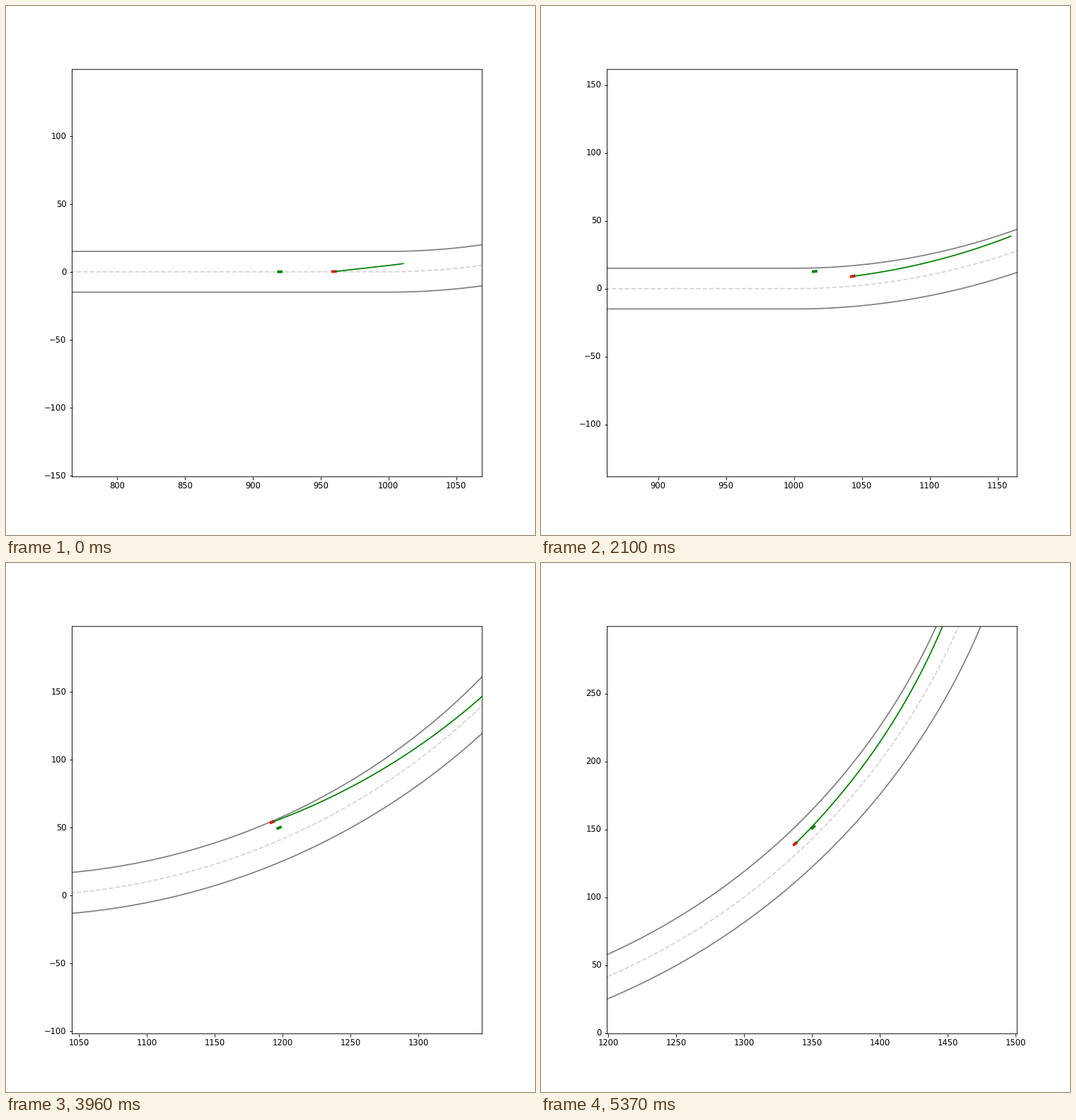
A matplotlib script for the animation above (5400 ms loop, 748 by 748 pixels).

```python
import numpy as np
import matplotlib.pyplot as plt
from matplotlib.animation import FuncAnimation
from matplotlib.patches import Rectangle

plt.rcParams.update({"path.snap": False, "text.hinting": "none"})

FRAMES, INTERVAL = 180, 30
BEND, R, HALF_ROAD = 1000, 500, 15      # bend start, radius, half road width
CAR = np.array([4, 2])
HALF_VIEW = np.array([150 * 0.775 / 0.77, 150])
T = np.arange(FRAMES)


def smooth(keys, values):
    """Smooth curve over all frames through a few key points."""
    keys, values = np.array(keys), np.array(values)
    slopes = np.gradient(values, keys)
    slopes[0] = 0
    k = np.clip(np.searchsorted(keys, T, side="right") - 1, 0, len(keys) - 2)
    dt = keys[k + 1] - keys[k]
    u = (T - keys[k]) / dt
    return (values[k] * (1 + 2 * u) * (1 - u) ** 2
            + values[k + 1] * u * u * (3 - 2 * u)
            + slopes[k] * dt * u * (1 - u) ** 2
            - slopes[k + 1] * dt * u * u * (1 - u))


def road_point(s, d):
    """Distance along the road and offset to the left, as x and y."""
    phi = np.maximum(s - BEND, 0) / R
    return np.array([np.minimum(s, BEND) + (R - d) * np.sin(phi),
                     R - (R - d) * np.cos(phi)])


def drive(start, speed, offset):
    """Distance along the road, rear right corner and heading per frame."""
    forward = np.sqrt(speed ** 2 - np.gradient(offset) ** 2)
    s = np.empty(FRAMES)
    s[0] = start
    for i in T[1:]:
        step = (forward[i - 1] + forward[i]) / 2
        s[i] = s[i - 1] + step * (R / (R - offset[i]) if s[i - 1] > BEND else 1)
    pos = road_point(s, offset)
    dx, dy = np.gradient(pos, axis=1)
    return s, pos.T - CAR / 2, np.arctan2(dy, dx)


def place(car, corner, heading):
    car.set_xy(corner)
    car.set_angle(np.degrees(heading))


lead_speed = 0.5 + 0.02 * T
lead_offset = 14.4 * np.exp(-((T - 118.5) / 39.5) ** 2 / 2)
lead_s, lead_corner, lead_heading = drive(960, lead_speed, lead_offset)

chase_offset = smooth([0, 30, 54, 76, 95, 114, 149, 179],
                      [0, 2.5, 7.9, 13.1, 12.1, 8, 7.8, 3.8])
_, chase_corner, chase_heading = drive(
    920, np.minimum(0.5 + 0.025 * T, 3.95), chase_offset)

# the lead car plans fifty steps ahead towards an offset on the road
reach = np.minimum(50 * lead_speed + 26, 198) * R / (R - lead_offset)
aim = smooth([0, 30, 54, 86, 114, 149, 179],
             [5.9, 8.6, 10.6, 11.5, 5.2, 5.8, 10.9])

fig, ax = plt.subplots(figsize=(9, 9), dpi=748 / 9)
for axis in (ax.xaxis, ax.yaxis):
    axis.set_major_locator(plt.MultipleLocator(50))

s_road = np.append(0, np.linspace(BEND, BEND + R * np.pi / 2, 200))
for offset in (HALF_ROAD, -HALF_ROAD):
    ax.plot(*road_point(s_road, offset), color="gray", zorder=1)
ax.plot(*road_point(s_road, 0), "--", color="lightgray", zorder=1)

lead, chase = (ax.add_patch(Rectangle((0, 0), *CAR, facecolor=c, zorder=2))
               for c in ("red", "green"))
plan, = ax.plot([], [], color="green", zorder=3)


def update(i):
    place(lead, lead_corner[i], lead_heading[i])
    place(chase, chase_corner[i], chase_heading[i])

    # the plan starts just ahead of the middle of the turned car
    a = lead_heading[i]
    turn = np.array([[np.cos(a), -np.sin(a)], [np.sin(a), np.cos(a)]])
    x, y = lead_corner[i] + turn @ (CAR * [0.7, 0.5])
    bent = x > BEND
    s0 = BEND + R * np.arctan2(x - BEND, R - y) if bent else x
    d0 = R - np.hypot(x - BEND, R - y) if bent else y
    plan.set_data(*road_point(np.linspace(s0, lead_s[i] + reach[i], 51),
                              np.linspace(d0, aim[i], 51)))

    low, high = chase_corner[i] - HALF_VIEW, chase_corner[i] + HALF_VIEW
    ax.set_xlim(low[0], high[0])
    ax.set_ylim(low[1], high[1])
    return plan, lead, chase


anim = FuncAnimation(fig, update, frames=FRAMES, interval=INTERVAL,
                     repeat=True, repeat_delay=0, blit=False)
plt.show()
```
